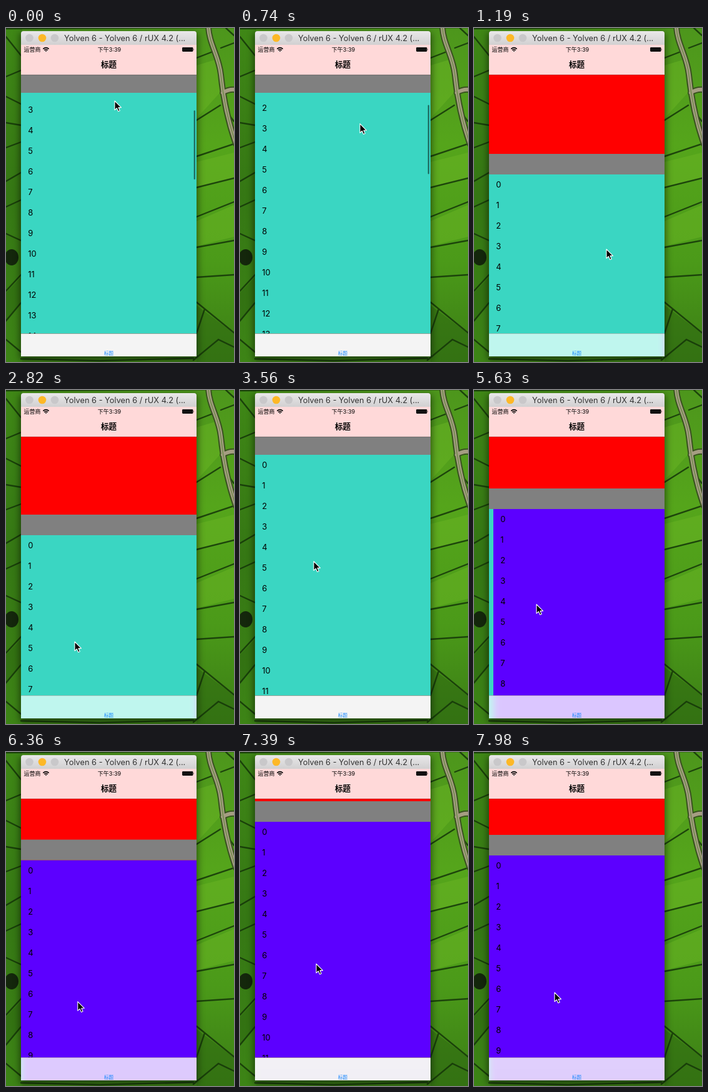
These frames come from a looping animation (365x536 px, 8000 ms). An HTML page:

```html
<!DOCTYPE html>
<html lang="zh">
<head>
<meta charset="utf-8">
<style>
  html, body { margin: 0; width: 100%; height: 100%; overflow: hidden; background: #438b17; }
  svg { display: block; width: 100vw; height: 100vh; }
  text { font-family: Inter, "Noto Sans CJK SC", "Noto Sans CJK", sans-serif; }
  .ridge { fill: none; stroke: #143509; stroke-width: 2.4; stroke-linecap: round; opacity: .85; }
  .row { font-size: 13px; }
</style>
</head>
<body>
<svg viewBox="0 0 365 536" xmlns="http://www.w3.org/2000/svg">
  <defs>
    <linearGradient id="field" x1="0" y1="0" x2="0" y2="1">
      <stop offset="0" stop-color="#4d961c"/>
      <stop offset=".35" stop-color="#55a51b"/>
      <stop offset=".7" stop-color="#4b9a19"/>
      <stop offset="1" stop-color="#3b7d15"/>
    </linearGradient>
    <linearGradient id="shade" x1="0" y1="0" x2="0" y2="1">
      <stop offset="0" stop-color="#3f8716"/>
      <stop offset=".5" stop-color="#357714"/>
      <stop offset="1" stop-color="#3d8416"/>
    </linearGradient>
    <linearGradient id="bar" x1="0" y1="0" x2="0" y2="1">
      <stop offset="0" stop-color="#e9e8e9"/>
      <stop offset="1" stop-color="#d1d0d1"/>
    </linearGradient>
    <clipPath id="win"><path d="M24 527V9q0-4 4-4H301q4 0 4 4V527Z"/></clipPath>
    <clipPath id="body"><rect x="24" y="75" width="281" height="415.5"/></clipPath>
    <clipPath id="tab"><rect x="24" y="490.5" width="281" height="36.5"/></clipPath>
    <filter id="soft" x="-20%" y="-20%" width="140%" height="140%"><feGaussianBlur stdDeviation="6"/></filter>
  </defs>

  <!-- fields -->
  <rect width="365" height="536" fill="url(#field)"/>
  <rect width="26" height="536" fill="url(#shade)"/>
  <path fill="#6ab524" opacity=".5" d="M305 60L338 50L346 100L305 145ZM305 310L365 284V335L305 350ZM305 215L365 200V240L305 255Z"/>
  <path fill="#2c6710" opacity=".5" d="M305 445L365 490V536H305ZM0 425L24 400V440L0 470Z"/>
  <path class="ridge" d="M305 48L336 36M344 32L365 24M305 148L343 124M305 206L365 186M305 256L365 241M305 303L365 279M305 352L365 341M305 400L365 396M305 440L365 489M318 451L305 490M300 533L340 500L365 512M352 0L365 12M350 130L365 150"/>
  <path class="ridge" d="M0 14L24 44M0 78L24 68M0 110L24 122M0 152L24 156M0 192L24 183M0 246L24 232M0 287L24 276M0 330L24 341M0 422L24 396M0 470L24 441M0 500L24 520M0 1L365 -1M24 531L150 534L300 530"/>
  <ellipse cx="9" cy="368" rx="11" ry="13" fill="#14270c"/>
  <g fill="none" stroke-linecap="round">
    <path d="M324 -2C325 25 341 45 344 75S352 140 368 186M347 104Q356 98 367 99" stroke="#39531f" stroke-width="10"/>
    <path d="M324 -2C325 25 341 45 344 75S352 140 368 186M347 104Q356 98 367 99" stroke="#a59d82" stroke-width="6"/>
    <path d="M324 -2C325 25 341 45 344 75S352 140 368 186" stroke="#6f8a4a" stroke-width="1.5"/>
  </g>

  <!-- window -->
  <rect x="22" y="8" width="285" height="524" fill="#000" opacity=".5" filter="url(#soft)"/>
  <g clip-path="url(#win)">
    <rect x="24" y="5" width="281" height="22" fill="url(#bar)"/>
    <g fill="#c9c8ca">
      <circle cx="37.5" cy="16" r="6.3"/>
      <circle cx="78" cy="16" r="6.3"/>
      <circle cx="58" cy="16" r="6.3" fill="#fdb827"/>
    </g>
    <text x="93" y="21" font-size="12.8" fill="#333">Yolven 6 - Yolven 6 / rUX 4.2 (...</text>

    <g clip-path="url(#body)">
      <rect x="24" y="75" width="281" height="416" fill="#f00"/>
      <g id="pages"></g>
      <rect id="head" x="24" width="281" height="33" fill="#808080"/>
      <rect id="thumb" x="300.7" width="2.2" height="111" rx="1.1" opacity=".5"/>
    </g>

    <g clip-path="url(#tab)">
      <rect x="24" y="490" width="281" height="37" fill="#f4f4f4"/>
      <g id="tint">
        <g id="glow" filter="url(#soft)">
          <rect x="-60" y="465" width="341" height="90" fill="#bff6ee"/>
          <rect x="281" y="465" width="341" height="90" fill="#dbc6ff"/>
        </g>
      </g>
    </g>
    <path d="M24 490.5H305" stroke="#000" stroke-opacity=".2" stroke-width=".6"/>
    <text x="164.5" y="524.6" font-size="7.6" text-anchor="middle" fill="#1486ff">标题</text>

    <rect x="24" y="27" width="281" height="48" fill="#ffd9d9"/>
    <path d="M24 75.2H305" stroke="#000" stroke-opacity=".3" stroke-width=".7"/>
    <text x="28.5" y="38.2" font-size="9">运营商</text>
    <text x="165.5" y="38.2" font-size="9" text-anchor="middle">下午3:39</text>
    <text x="164.5" y="63" font-size="12.6" font-weight="600" text-anchor="middle">标题</text>
    <g fill="none" stroke="#000" stroke-width="1.5">
      <path d="M59.3 33.6Q64 29.6 68.7 33.6M61.2 35.7Q64 33.4 66.8 35.7"/>
      <path d="M62.6 36.6Q64 35.7 65.4 36.6L64 38.2Z" fill="#000" stroke="none"/>
    </g>
    <rect x="282" y="31" width="17.5" height="7" rx="1.4" fill="#111"/>
    <path d="M300.2 33.2q1.3 1.3 0 2.6Z"/>
  </g>

  <path id="arrow" d="M0 0V14.6L3.4 11.5L5.7 16.8L8.2 15.7L6 10.6H10.5Z" stroke="#fff" stroke-width="1.1" stroke-linejoin="round"/>
</svg>
<script>
const $ = id => document.getElementById(id);
const LOOP = 8000, TICK = 147.7, PIN = 71, ROW = 33, WIDTH = 281;

// tick, pointer x, pointer y, scroll (negative once the header is pinned), page shift
const KEYS = [
  [0, 174, 117, -88, 0],
  [1, 178, 72, -133, 0],
  [2, 182, 53, -152, 0],
  [8, 212, 355, 131, 0],
  [9, 212, 355, 131, 0],
  [12, 130, 213, 131, 0],
  [14, 14, 300, 131, 0],
  [17, 108, 408, 131, 0],
  [18, 110, 405, 129, 0],
  [19, 110, 404, 129, 0],
  [24, 118, 275, 0, 0],
  [26, 121, 293, 0, 0],
  [31, 133, 370, 77, 0],
  [33, 133, 371, 77, 0],
  [35, 230, 348, 87, 0],
  [37, 112, 345, 87, -215],
  [38, 100, 344, 87, -274],
  [39, 102, 352, 87, -WIDTH],
  [42, 114, 418, 87, -WIDTH],
  [47, 118, 331, 0, -WIDTH],
  [49, 121, 332, 0, -WIDTH],
  [50, 122, 340, 8, -WIDTH],
  [54, 129, 386, 62, -WIDTH]
];

function pose(tick) {
  let i = 0;
  while (i < KEYS.length - 2 && KEYS[i + 1][0] <= tick) i++;
  const a = KEYS[i], b = KEYS[i + 1];
  const k = (tick - a[0]) / (b[0] - a[0]);
  return a.map((v, j) => v + (b[j] - v) * k).slice(1);
}

function page(color, x) {
  let s = `<g transform="translate(${x})"><rect width="${WIDTH}" height="1000" fill="${color}"/><g class="list">`;
  for (let i = 0; i < 20; i++) s += `<text class="row" x="11.3" y="${i * ROW + 21}">${i}</text>`;
  return s + '</g></g>';
}
$('pages').innerHTML = page('#3ad6c2', 0) + page('#5c00ff', WIDTH);
const list = document.querySelector('.list');

function move(el, x, y) {
  el.setAttribute('transform', `translate(${x} ${y})`);
}

function draw(ms) {
  const tick = Math.max(0, Math.floor((ms - 4) / TICK));
  const [x, y, scroll, shift] = pose(tick);
  const top = PIN + Math.max(0, scroll), offset = Math.max(0, -scroll);
  move($('arrow'), x, y);
  move($('pages'), 24 + shift, top + ROW);
  move($('glow'), 24 + shift, 0);
  move(list, 0, -offset);
  $('head').setAttribute('y', top);
  $('thumb').setAttribute('y', 107 + offset * .286);
  $('thumb').setAttribute('visibility', offset ? 'visible' : 'hidden');
  $('tint').setAttribute('opacity', Math.min(1, Math.max(0, (top - 72) / 76)));
}

function run(now) {
  draw(now % LOOP);
  requestAnimationFrame(run);
}
draw(0);
requestAnimationFrame(run);
</script>
</body>
</html>
```
